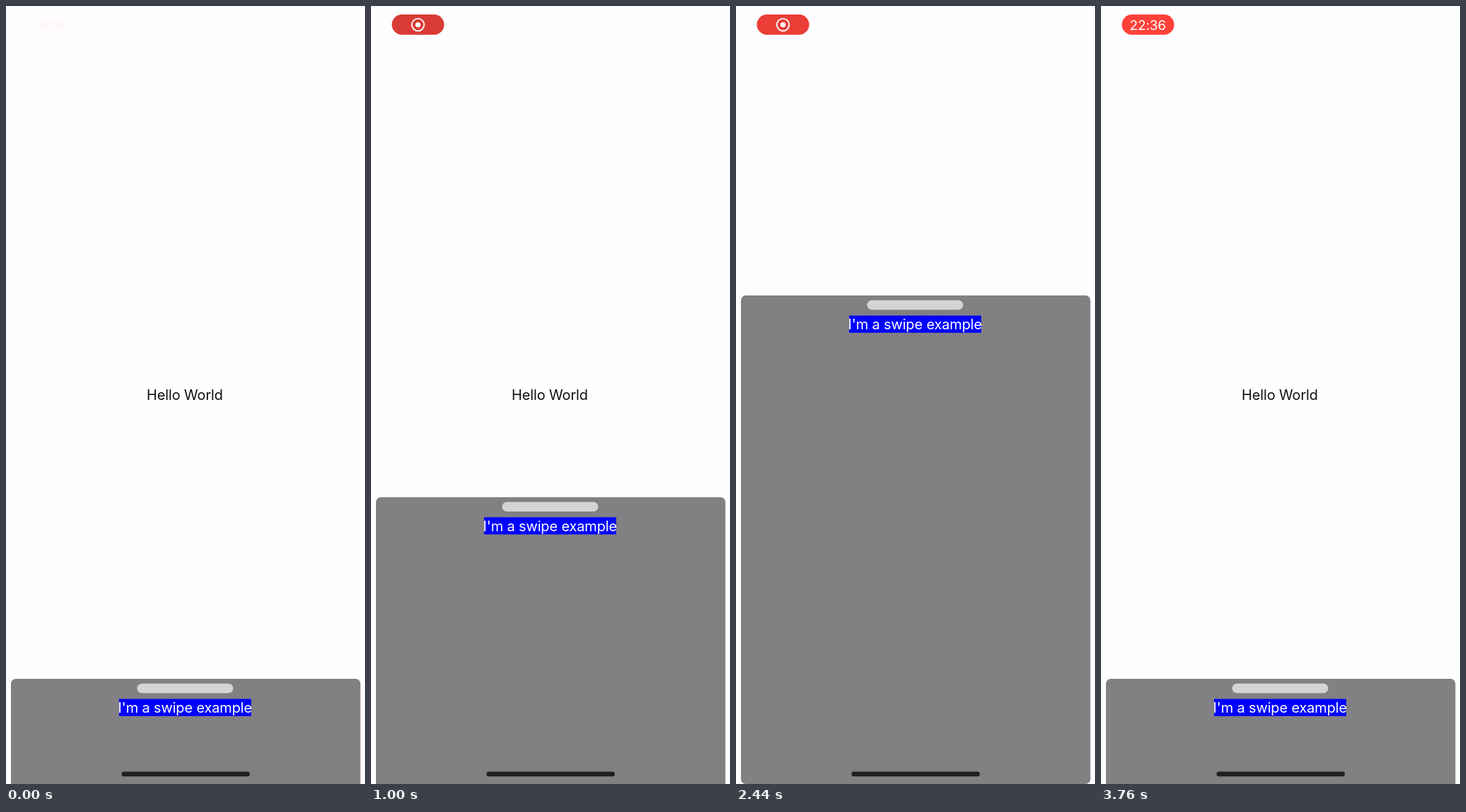
Recreate the animation shown at these times as an HTML page. Size 508 by 1102 pixels, loop 3.8 s.

```html
<!DOCTYPE html>
<html lang="en">
<head>
<meta charset="utf-8">
<title>Swipe sheet</title>
<style>
  html, body { margin: 0; width: 100%; height: 100%; overflow: hidden; background: #fefdff; }
  svg { display: block; width: 508px; height: 1102px; }
  text { font: 20px Inter, "Liberation Sans", sans-serif; letter-spacing: -.15px; text-anchor: middle; }
  #clock { font-size: 19px; }
</style>
</head>
<body>
<svg viewBox="0 0 508 1102">
  <text x="253" y="558.3" fill="#111">Hello World</text>
  <g id="sheet">
    <rect x="7" width="494.5" height="692" rx="7" fill="#828082"/>
    <rect x="185.5" y="6.8" width="136" height="13.5" rx="6.75" fill="#d5d3d5"/>
    <rect x="160" y="28.5" width="187" height="24.3" fill="#00f"/>
    <text x="253.3" y="48" fill="#fff">I'm a swipe example</text>
  </g>
  <rect x="163.5" y="1084.5" width="181.5" height="6.8" rx="3.4" fill="#211f21"/>
  <g id="pill">
    <rect id="pillBody" x="29.5" y="12" width="74" height="28.8" rx="14.4"/>
    <g id="record">
      <circle cx="66.5" cy="26.6" r="8.7" fill="none" stroke="#fff" stroke-width="1.9"/>
      <circle cx="66.5" cy="26.6" r="3.7" fill="#fff"/>
    </g>
    <text id="clock" x="66.3" y="33.5" fill="#fff">22:36</text>
  </g>
</svg>
<script>
  const LOOP = 3800, CLOSED = 953, OPEN = 410;
  const BRIGHT = [255, 65, 57], DIM = [214, 58, 51];
  // [time, brightness] turning points of the recording pulse
  const PULSE = [[0, 1], [800, 0], [1880, 1], [3020, 0], [3560, 1], [LOOP, 1]];
  const el = id => document.getElementById(id);
  const [sheet, pill, pillBody, record, clock] =
    ['sheet', 'pill', 'pillBody', 'record', 'clock'].map(el);

  const mix = (a, b, p) => a + (b - a) * p;
  function ease(t, from, to) {
    const p = Math.min(1, Math.max(0, (t - from) / (to - from)));
    return p * p * (3 - 2 * p);
  }
  function pulse(t) {
    const i = PULSE.findIndex(k => k[0] > t);
    const [t0, v0] = PULSE[i - 1], [t1, v1] = PULSE[i];
    return mix(v0, v1, ease(t, t0, t1));
  }

  function draw(t) {
    const lift = ease(t, 890, 1120) - ease(t, 2590, 2820);
    sheet.setAttribute('transform', `translate(0 ${mix(CLOSED, OPEN, lift)})`);

    const grow = ease(t, 0, 320);
    pill.setAttribute('transform',
      `translate(66.5 26.5) scale(${mix(.5, 1, grow)}) translate(-66.5 -26.5)`);
    pill.setAttribute('opacity', mix(.02, 1, grow));

    const glow = pulse(t);
    pillBody.setAttribute('fill', `rgb(${DIM.map((c, i) => Math.round(mix(c, BRIGHT[i], glow)))})`);

    const swap = ease(t, 3460, 3660);
    record.setAttribute('opacity', 1 - swap);
    clock.setAttribute('opacity', swap);
  }

  const start = performance.now();
  function tick() {
    draw((performance.now() - start) % LOOP);
    requestAnimationFrame(tick);
  }
  tick();
</script>
</body>
</html>
```
